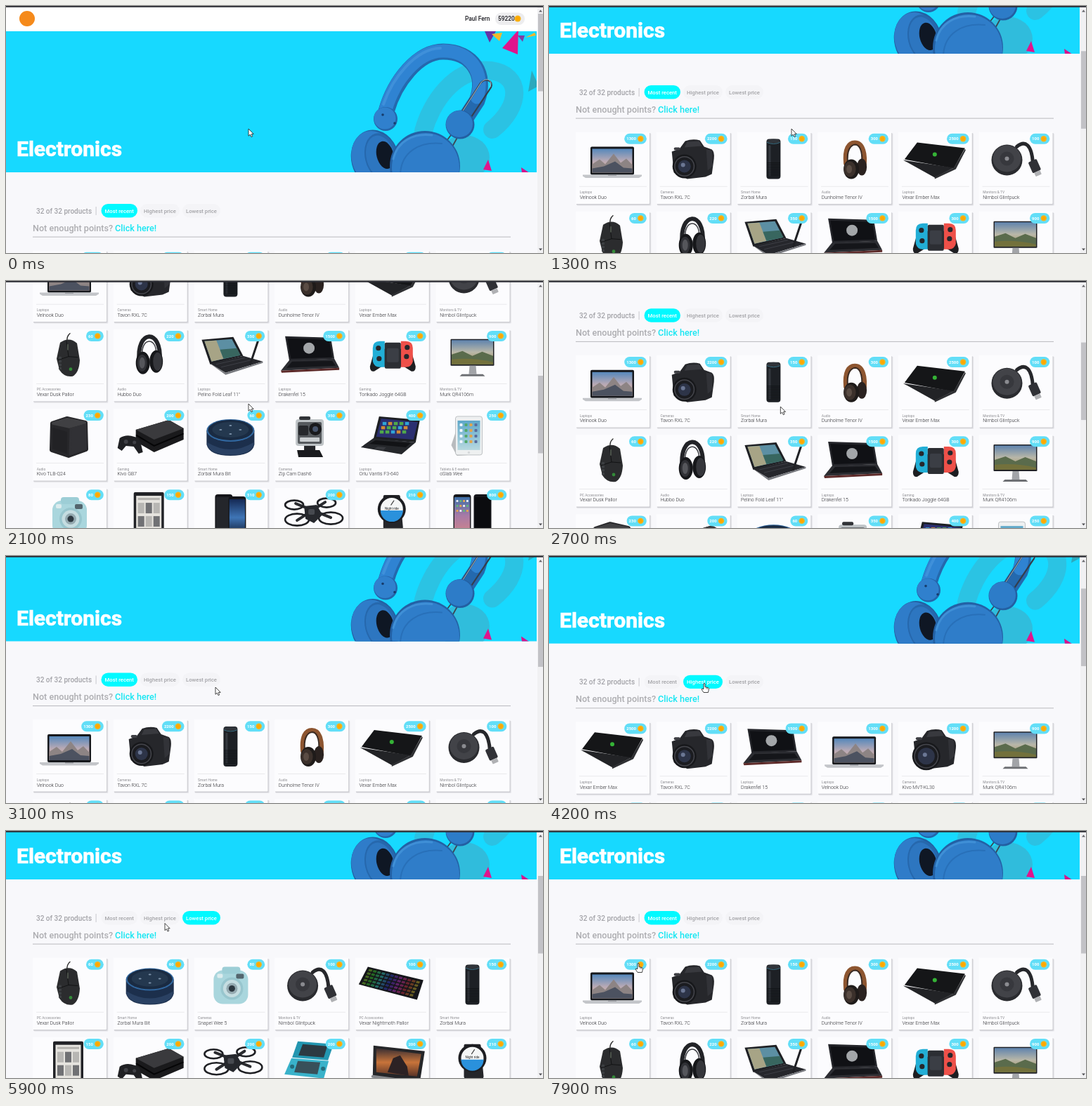
Recreate the animation shown at these times as an HTML page. Size 764 px wide and 352 px high, loop 8 s.

```html
<!DOCTYPE html>
<html lang="en">
<head>
<meta charset="utf-8">
<title>Shop catalogue</title>
<style>
html, body { margin: 0; width: 100%; height: 100%; overflow: hidden; background: #f8f8fb; }
svg { display: block; width: 764px; height: 352px; font-family: Roboto, Arial, sans-serif; }
.title { font-size: 30px; font-weight: 700; fill: #fff; stroke: #fff; stroke-width: .7px; }
.count { font-size: 10px; font-weight: 500; fill: #a3a3a8; }
.tab { font-size: 7.7px; font-weight: 500; }
.points { font-size: 12.6px; font-weight: 500; fill: #adadb1; }
.user { font-size: 8.4px; font-weight: 500; fill: #1c1c22; }
.kind { font-size: 4.9px; fill: #8c8c90; }
.name { font-size: 6.95px; font-weight: 300; fill: #26262a; }
.price { font-size: 6px; font-weight: 700; fill: #fff; }
</style>
</head>
<body>
<svg id="stage" viewBox="0 0 764 352"></svg>
<script>
const LOOP = 8000, STEP = 100;

// Drawing helpers
const rect = (x, y, w, h, fill, r = 0, more = '') =>
  `<rect x="${x}" y="${y}" width="${w}" height="${h}" rx="${r}" fill="${fill}" ${more}/>`;
const oval = (x, y, rx, fill, ry = rx, more = '') =>
  `<ellipse cx="${x}" cy="${y}" rx="${rx}" ry="${ry}" fill="${fill}" ${more}/>`;
const shape = (d, fill, more = '') => `<path d="${d}" fill="${fill}" ${more}/>`;
const soft = (d, fill, w) =>
  shape(d, fill, `stroke="${fill}" stroke-width="${w}" stroke-linejoin="round"`);
const line = (d, color, w = 1) =>
  `<path d="${d}" fill="none" stroke="${color}" stroke-width="${w}" stroke-linecap="round"/>`;
const text = (x, y, cls, s, more = '') => `<text x="${x}" y="${y}" class="${cls}" ${more}>${s}</text>`;
const group = (inner, more) => `<g ${more}>${inner}</g>`;
const shift = (x, y, inner) => group(inner, `transform="translate(${x} ${y})"`);
const repeat = (n, fn) => Array.from({ length: n }, (_, i) => fn(i)).join('');
const coin = (x, y, r) => oval(x, y, r, '#f7b21a') + oval(x, y, r * .6, '#ffa800');
const gradient = (id, stops) =>
  `<linearGradient id="${id}" x2="0" y2="1">` +
  stops.map((c, i) => `<stop offset="${i / (stops.length - 1)}" stop-color="${c}"/>`).join('') +
  '</linearGradient>';

const camera = lens =>
  shape('M-30 -14L-19 -18 -11 -29Q0 -33 10 -30L16 -21 27 -17Q31 -14 30 -4L27 18 18 22 -8 25 -27 16Z', '#26272b') +
  shape('M-8 -28L9 -29 13 -22 -12 -20Z', '#38393e') + rect(-27, -20, 9, 4, '#3e3f44', 2) +
  shape('M19 -17L27 -16 28 7 21 13Z', '#323338') +
  oval(-12, 7, lens, '#17181b') + oval(-12, 7, lens - 2.5, '#45464c') + oval(-12, 7, lens - 4, '#1b1c20') +
  oval(-12, 7, lens - 8, '#2d3448') + oval(-14, 5, 3, '#6b7794');

const handset = (x, screen) =>
  rect(x, -33, 25, 60, '#15161a', 4) + rect(x + 1.4, -29, 22.2, 52, screen, 1);

const icons = {
  silver: rect(-31, -21, 62, 40, '#16181c', 2) + rect(-28.5, -18, 57, 34, 'url(#sky)') +
    shape('M-28.5 16V4L-18 -3 -10 4 2 -11 12 2 20 -4 28.5 5V16Z', '#8d8484') +
    shape('M-28.5 16V10L-12 7 4 0 16 9 28.5 10V16Z', '#4c5260') +
    shape('M-42 19H42V21L38 23.5H-38L-42 21Z', '#c3c5c9') + rect(-6, 19, 12, 1.5, '#96989d'),
  dslr: camera(17),
  tower: rect(-10, -32, 20, 57, '#1d2025', 4) + oval(0, -29, 9.5, '#30343a', 3) +
    line('M-9 -27Q0 -23 9 -27', '#3b7186') + rect(-7, -23, 3, 44, '#353940', 1) +
    repeat(9, i => line(`M-9 ${2 + i * 2.3}H9`, '#0f1114', .8)),
  retro: line('M-12 3C-14 -18 -8 -27 1 -27C13 -27 17 -10 14 9', '#8d5530', 6) +
    line('M-9 2C-11 -16 -5 -24 2 -24C10 -23 13 -8 10 6', '#3a2a22', 2) +
    oval(11, 8, 7, '#2a2220', 12) + oval(-4, 11, 11, '#1f1b1a', 14) + oval(-6, 11, 8.5, '#3b302b', 11) +
    oval(-7, 11, 4, '#5a4c44', 6),
  blade: shape('M-25 -27L43 -19 27 10 -43 -3Z', '#151618') + shape('M-45 -2L27 9 0 23Z', '#222326') +
    shape('M27 9L43 -18 44 -16 30 11 0 25V22Z', '#2f3033') + oval(0, -10, 3, '#35b336'),
  puck: line('M2 -21C14 -31 23 -24 25 2', '#26272b', 5) + oval(-12, -2, 22, '#2a2b2f') +
    oval(-12, -4, 20, '#424348', 19) + oval(-12, -4, 10, '#37383d') + oval(-12, -4, 3, '#8a8b90') +
    group(rect(-6.5, -10, 13, 17, '#303136', 2) + rect(-4.5, 7, 9, 6, '#b0b1b4', 1), 'transform="translate(28 8) rotate(-24)"'),
  mouse: line('M-3 -24Q-4 -32 1 -36', '#2a2a2a', 1.4) +
    shape('M-13 -23Q0 -32 11 -22L15 2Q14 20 5 25Q-7 27 -14 16L-18 0Z', '#2b2c2e') +
    line('M-4 -25L-1 -3 12 -2M-16 2L-1 -3', '#121314', 1) + line('M-2 -20V-13', '#4a5149', 2) +
    repeat(4, i => rect(-15, -3 + i * 5, 4, 3.5, '#3c3f42', 1)) + oval(2, 15, 2.4, '#338a38'),
  black: line('M-15 4C-20 -42 17 -44 14 2', '#222327', 6) + line('M-11 -6C-12 -30 9 -31 9 -8', '#3c3d42', 1.5) +
    oval(9, 4, 9.5, '#16171a', 16) + oval(11, 4, 6.5, '#35363b', 13) +
    oval(-10, 6, 10, '#16171a', 16) + oval(-11, 6, 7, '#303136', 12) + oval(-11, 6, 4, '#55565b', 8),
  fold: shape('M-41 -27L4 -31 18 -4 -29 8Z', '#1e1f23') + shape('M-37 -25L2 -28 14 -5 -27 4Z', '#5c8fa3') +
    shape('M-37 -25L-20 -26 -10 0 -27 4Z', '#a7a486') + shape('M-15 -13L9 -15 14 -5 -10 0Z', '#38665f') +
    shape('M-29 7L18 -4 46 4 -7 20Z', '#26272c') + shape('M-29 7L-7 20 46 4V6L-7 23Z', '#77797e') +
    line('M-20 8L20 -1M-13 12L29 2', '#44464d', .8) + line('M40 -28L28 8', '#202125', 3),
  gamer: shape('M-37 -32L28 -30 33 0 -31 3Z', '#24252a') + shape('M-34 -29L26 -27 30 -2 -29 0Z', '#101115') +
    shape('M-31 2L33 0 40 13 -43 17Z', '#2c2d32') + shape('M-27 4L30 3 35 10 -35 13Z', '#15161a') +
    shape('M-43 17L40 13V16L-42 20Z', '#5d2a29') + oval(-3, -15, 8, '#a3a6a9'),
  console: shape('M-24 -14L-31 11Q-31 19 -25 18L-14 11H17L28 18Q34 19 34 11L27 -14Z', '#1d1e21') +
    shape('M-10 -25H-17Q-27 -25 -27 -15V4Q-25 12 -17 12H-10Z', '#22aed6') +
    shape('M13 -25H20Q30 -25 30 -15V4Q28 12 20 12H13Z', '#ee5049') +
    rect(-10, -23, 23, 37, '#2c2e33', 2) + rect(-7, -15, 17, 20, '#3b3e45', 2) +
    [[-19, -15], [-18, 0], [21, -3], [22, -16]].map(p => oval(...p, 3.6, '#26272c')).join(''),
  monitor: rect(-31, -28, 62, 38, '#202125', 1) + rect(-29.5, -26.5, 59, 34.5, 'url(#dusk)') +
    shape('M-29.5 8V-6L-14 -11 0 -4 14 -10 29.5 -4V8Z', '#5a6b4c') + shape('M-29.5 8V1Q0 -2 29.5 5V8Z', '#73713c') +
    shape('M-4 10H5L6 22H-5Z', '#a2a4a8') + shape('M-15 22H15L18 25H-18Z', '#6e7074'),
  cube: soft('M-24 -21L-3 -28 23 -22 24 16 -1 25 -25 17Z', '#27272a', 6) +
    soft('M-23 -21L-3 -27 22 -22 0 -16Z', '#404043', 4) + soft('M2 -13L23 -19V15L1 23Z', '#313135', 3) +
    shape('M-24 -15L-3 -9V22L-24 15Z', '#222225'),
  deck: shape('M-20 -12L27 -26 48 -14V2L6 20 -20 5Z', '#1a1a1c') + shape('M-20 -12L27 -26 48 -14 6 2Z', '#3a3a3d') +
    line('M-19 -4L6 11 47 -6', '#050506', 2) + shape('M-43 0Q-34 -6 -22 -2Q-14 -1 -13 7L-10 20 -16 22 -23 12 -34 11 -40 18 -46 14Z', '#202124') +
    oval(-34, 5, 3, '#3f4045') + oval(-22, 6, 2.5, '#3f4045'),
  disc: shape('M-34 -11V9Q-30 25 0 25Q31 25 34 9V-11Z', '#1c2f4c') + shape('M-33 6Q0 26 33 6V10Q28 24 0 24Q-28 24 -33 10Z', '#2a4163') +
    oval(0, -11, 34, '#31679f', 16) + oval(0, -11.5, 32, '#1a2b42', 14.5) + oval(0, -12, 26, '#24384f', 11) +
    [[-14, -12], [14, -12], [0, -18], [0, -6]].map(p => oval(...p, 2, '#7d93ab', 1)).join(''),
  action: rect(-22, -27, 40, 38, '#bfc4c7', 4) + rect(-19, -23, 34, 31, '#565a5e', 2) + rect(-18, -18, 14, 14, '#26282c', 2) +
    oval(6, -13, 9, '#191a1d') + oval(6, -13, 4, '#47546b') + rect(-17, -31, 16, 5, '#313337', 2) +
    rect(-16, -1, 28, 6, '#c9cdd0', 1) + rect(-10, 11, 16, 8, '#242529') + shape('M-20 17H12L17 27H-18Z', '#191a1d'),
  tiles: shape('M-18 -31L40 -26 34 6 -26 1Z', '#1d1f23') + shape('M-15 -28L37 -23 31 2 -22 -2Z', '#2b2f70') +
    repeat(15, i => rect(-13 + (i % 5) * 8 - (i / 5 | 0) * 2, -23 + (i / 5 | 0) * 6, 5.5, 4.5, ['#2fa4d8', '#c34d45', '#50a94a', '#8b54b5', '#d08a35'][i * 7 % 4 + i % 2])) +
    shape('M-26 0L34 6 14 23 -44 13Z', '#25272b') + shape('M-23 3L27 7 20 13 -32 8Z', '#121316') + shape('M-20 12L-8 13 -12 17 -25 15Z', '#393b40'),
  slate: shape('M-30 10L-18 -26 -10 -28 -6 24 -22 25Z', '#b8bbbe') + rect(-24, -31, 38, 55, '#eef0f1', 3, 'stroke="#b0b4b7" stroke-width=".8"') +
    rect(-21, -25, 32, 42, 'url(#ice)') + repeat(16, i => rect(-18 + (i % 4) * 7, -21 + (i / 4 | 0) * 8, 4, 4, ['#f0f5ff', '#52a86a', '#e2a54b', '#596d9c'][i * 5 % 4], 1)) +
    oval(-5, 20.5, 1.7, '#d5d8da'),
  instant: rect(-24, -24, 49, 48, '#a9d6dd', 13) + rect(-12, -29, 26, 10, '#9dced6', 4) + rect(-19, -19, 8, 6, '#dcecee', 2) +
    rect(8, -19, 11, 7, '#54666e', 2) + oval(2, 2, 16, '#98c6ce') + oval(2, 2, 12.5, '#c5dde1') + oval(2, 2, 8, '#94a9b0') +
    oval(2, 2, 4.5, '#2d3840'),
  reader: rect(-23, -36, 43, 64, '#212226', 2) + rect(-19.5, -31, 36, 52, '#e6e4df') + rect(-17, -28, 31, 3, '#b4b2ae') +
    repeat(6, i => rect(-17 + (i % 3) * 11, -21 + (i / 3 | 0) * 19, 9, 15, i % 2 ? '#707174' : '#b7b6b3')),
  curved: handset(-22, '#24262b') + shift(0, 3, handset(-3, 'url(#night)')),
  drone: line('M-22 -20L28 0M-20 4L20 -22', '#2b2c30', 4) +
    [[-24, -18, 13], [22, -21, 13], [-20, 3, 17], [28, 1, 17]].map(p => oval(p[0], p[1], p[2], 'none', p[2] / 2, 'stroke="#1f2024" stroke-width="2.6"')).join('') +
    shape('M-10 -16L8 -18 16 -4 4 8 -8 2Z', '#26282d') + rect(-4, -12, 9, 8, '#474a50', 2),
  watch: soft('M-10 -30H10L14 14 10 30H-4L-10 14Z', '#25262a', 4) + oval(0, -12, 20, '#1d1e22') + oval(0, -12, 16, '#f4f6f6') +
    shape('M-16 -10H16A16 16 0 0 1 -16 -10Z', '#2a91dc') + line('M3 -24L-1 -18', '#444', 1.2) +
    text(0, -11.5, 'kind', 'Night ride', 'text-anchor="middle" style="font-size:4.6px;fill:#222"'),
  duo: handset(2, '#0b0c0f') + handset(-27, 'url(#swirl)') +
    repeat(12, i => rect(-23 + (i % 4) * 4.8, -25 + (i / 4 | 0) * 7, 3, 3, ['#e8eef5', '#62b878', '#e4a552'][i % 3], .8)),
  keys: shape('M-34 -29L45 -10 36 18 -47 -4Z', '#15161a') +
    group(repeat(60, i => rect((i % 12) * 6.4, (i / 12 | 0) * 4.6, 5, 3, `hsl(${(i % 12) * 29 + 90},50%,27%)`, .6)), 'transform="matrix(.96 .24 -.5 1 -32 -26)"'),
  zoom: camera(20),
  pocket: shape('M-19 -36L32 -32 24 -9 -27 -13Z', '#2396b0') + shape('M-12 -32L23 -29 18 -13 -18 -16Z', '#2c3a42') +
    shape('M-28 -12L25 -8 18 17 -38 11Z', '#39b2ca') + shape('M-19 -8L13 -6 9 11 -24 8Z', '#38505a') + oval(-27, 0, 3, '#246c7c') + oval(17, 3, 3, '#246c7c'),
  stand: shape('M-26 -30L47 -22 40 22 -27 14Z', '#252629') + shape('M-22 -26L42 -18 36 14 -22 8Z', 'url(#ember)') +
    shape('M-6 8L2 -12 12 -16 22 0 24 13Z', '#2c2224') + line('M-27 14L39 23', '#85878b', 4)
};

// icon | category | name | price
const goods = `silver|Laptops|Velnook Duo|1300
dslr|Cameras|Tavon RXL 7C|2200
tower|Smart Home|Zorbal Mura|150
retro|Audio|Dunholme Tenor IV|300
blade|Laptops|Vexar Ember Max|2500
puck|Monitors &amp; TV|Nimbol Glintpuck|100
mouse|PC Accessories|Vexar Dusk Pallor|60
black|Audio|Hubbo Duo|220
fold|Laptops|Pelino Fold Leaf 11"|350
gamer|Laptops|Drakenfel 15|1500
console|Gaming|Torikado Joggle 64GB|300
monitor|Monitors &amp; TV|Murk QR4106m|900
cube|Audio|Kivo TLB-Q24|230
deck|Gaming|Kivo GB7|200
disc|Smart Home|Zorbal Mura Bit|60
action|Cameras|Zip Cam Dash6|350
tiles|Laptops|Orlu Vantis F3-640|400
slate|Tablets &amp; E-readers|oSlab Wee|250
instant|Cameras|Snapel Wee 5|80
reader|Tablets &amp; E-readers|Inkolo Page|150
curved|Phones|Starvo N6|510
drone|Drones|Whirlo Four|200
watch|Smart Home|Tempor Loop|210
duo|Phones|oSlab Call|800
keys|PC Accessories|Vexar Nightmoth Pallor|100
zoom|Cameras|Kivo MVT-KL30|1200
pocket|Gaming|Torikado Pair|200
stand|Tablets &amp; E-readers|Pelino Prop|200`.split('\n').map(row => {
  const [icon, kind, name, price] = row.split('|');
  return { icon, kind, name, price };
});

function card(p, i) {
  const x = 38 + (i % 6) * 114.7, y = 348.5 + Math.floor(i / 6) * 113.2;
  const w = 18 + p.price.length * 3.4, left = 100.8 - w;
  return shift(x, y,
    rect(1.5, 2, 105.8, 103, '#e4e4e8', 1) + rect(1, 1.5, 105.2, 102.4, '#cfcfd4', 1) + rect(0, 0, 105, 102.6, '#fcfcfe', 1) +
    shift(52, 42, icons[p.icon]) +
    rect(left, 2.2, w, 15, '#62def7', 7.5) + text(left + 3, 11.9, 'price', p.price) + coin(92.3, 9.7, 4.2) +
    rect(5, 77.3, 96, .7, '#e2e2e5') + text(5.7, 87.8, 'kind', p.kind) + text(5.7, 95.5, 'name', p.name));
}
const byPrice = sign => [...goods].sort((a, b) => sign * (a.price - b.price));
const lists = [goods, byPrice(-1), byPrice(1)];
const tabs = [['Most recent', 135.5, 51.5], ['Highest price', 191, 56], ['Lowest price', 251, 54]];

const tri = (points, fill) => `<polygon points="${points}" fill="${fill}"/>`;
const hero = rect(0, 36, 755, 201, '#17d9ff') + group(
  group(line('M594 178C604 140 638 86 690 92C734 98 734 142 692 176', '#2fbfdf', 26) + oval(652, 216, 36, '#35b8d6', 32), 'opacity=".85"') +
  tri('681,36 697,36 688,52', '#6434a6') + tri('691,40 706,38 702,50', '#f3b72c') + tri('729,34 706,60 728,69', '#e0148c') +
  tri('728,42 738,42 735,51', '#7d3fa6') + tri('739,45 752,38 754,42', '#f3b72c') + tri('748,92 743,122 758,114', '#2ca9bd') +
  tri('686,219 679,233 691,235', '#e0148c') + tri('733,230 745,238 734,238', '#d5158c') +
  line('M541 150C553 108 586 65 622 65C664 65 684 98 670 135L655 158', '#2469ae', 23) +
  line('M540 148C552 106 585 64 621 64C660 63 682 96 670 130', '#2f83d2', 19) +
  line('M537 140C550 102 583 61 618 60', '#3f90da', 4) +
  line('M648 152L675 110C682 102 694 106 690 116L662 158', '#343e4c', 2.2) +
  line('M649 151L676 109C683 101 693 105 689 115', '#b5cbd8', .9) +
  oval(540, 161, 17, '#2466ab') + oval(539, 160, 15.5, '#3080cd') + oval(536, 155, 1.8, '#173c6c') + oval(553, 167, 1.8, '#173c6c') +
  line('M636 180L624 196M644 184L634 202', '#3d4652', 1.8) +
  oval(646, 169, 20.5, '#235fa2') + oval(645, 168, 19, '#2d7cc8') +
  group(oval(525, 218, 34, '#2361a3', 42) + oval(523, 216, 31, '#2f7cc9', 39) + oval(534, 217, 23, '#2668ad', 34) +
    oval(533, 217, 20, '#2d76c0', 31) + oval(540, 216, 12, '#0f1724', 20), 'transform="rotate(-14 525 217)"') +
  oval(596, 228, 50, '#2361a5', 50) + oval(597, 230, 48, '#2f7dc9', 49) +
  line('M551 218C557 192 580 181 606 184', '#3f8fd6', 3) + line('M561 240C562 208 588 193 620 196', '#2870b9', 2),
  'clip-path="url(#heroBox)"');

const page = rect(0, 0, 756, 36, '#fff') + oval(30, 18, 11, '#f58a1b') + text(653, 21, 'user', 'Paul Fern') +
  rect(696, 9.5, 42, 17.5, '#ededef', 8.75) + text(700, 21, 'user', '59220') + coin(728, 18, 4.6) +
  hero + text(15, 214.3, 'title', 'Electronics') +
  text(43, 295.6, 'count', '32 of 32 products') + rect(127.6, 286, 1, 12, '#c9c9cd') +
  tabs.map(([label, x, w]) => group(rect(x, 282, w, 19.4, '', 9.7) +
    text(x + w / 2, 294.7, 'tab', label, 'text-anchor="middle"'), 'class="pill"')).join('') +
  text(38, 320.6, 'points', 'Not enought points? <tspan x="155" fill="#16e6f2">Click here!</tspan>') +
  rect(38, 328.6, 680, 1, '#b9b9bd') +
  lists.map(l => group(l.slice(0, 24).map(card).join(''), 'class="list"')).join('');

const stage = document.getElementById('stage');
stage.innerHTML = '<defs><clipPath id="heroBox"><rect y="36" width="755" height="201"/></clipPath>' +
  gradient('sky', ['#5688bb', '#b7a9b5', '#e5b197']) + gradient('dusk', ['#5f83ad', '#b9b7a8', '#9c8a57']) +
  gradient('ice', ['#5da7c9', '#b8d9e0']) + gradient('night', ['#152a55', '#3f75b6', '#0e1930']) +
  gradient('swirl', ['#3d6fa8', '#a77aa6', '#d1848a']) + gradient('ember', ['#3a2f33', '#c8743a', '#5a3428']) + '</defs>' +
  rect(0, 0, 764, 352, '#f8f8fb') + group(page, 'id="page"') +
  rect(756, 0, 8, 352, '#f1f1f3') + rect(757, 11, 7, 110.5, '#c2c2c6', 0, 'id="thumb"') +
  shape('M758 8.5L760.5 5.5 763 8.5Z', '#606064') + shape('M758 345.5L760.5 348.5 763 345.5Z', '#505054') +
  rect(0, 0, 764, 1.8, '#2c2d34') +
  group(shape('M0 0V10.2L2.4 8.1 4 11.6 5.7 10.8 4.2 7.4H7.2Z', '#fff', 'stroke="#1a1a1a" stroke-width=".8"'), 'id="arrow"') +
  group(shape('M-1 0Q0 -1.2 1 0V4.6L5.4 5.6Q6.8 6 6.4 8L5.4 12.5H-1L-4 8Q-4.4 6.4 -1 7.6Z', '#fff', 'stroke="#1a1a1a" stroke-width=".8"') +
    line('M2.8 5.2V7.4M4.5 5.6V7.6', '#1a1a1a', .5), 'id="hand"');

const [pageEl, thumb, arrow, hand] = ['page', 'thumb', 'arrow', 'hand'].map(id => document.getElementById(id));
const pills = stage.querySelectorAll('.pill'), listEls = stage.querySelectorAll('.list');

// Rows of time followed by values, linear in between
const scrollKeys = [[0, 0], [500, 0], [1300, 169], [2100, 393], [2300, 393], [3000, 130], [3100, 115.5],
  [3200, 112.3], [4400, 112.3], [5000, 168], [LOOP, 168]];
const mouseKeys = [[0, 345, 175], [2500, 345, 175], [3100, 298, 187], [3600, 221, 182], [4400, 221, 182], [5000, 278, 125],
  [5500, 278, 125], [5900, 226, 131.5], [6300, 161, 126], [7000, 161, 126], [7500, 127, 189], [LOOP, 127, 189]];
const clicks = [[0, 0], [3800, 1], [5300, 2], [6500, 0]];

function at(keys, t) {
  const i = keys.findIndex(k => k[0] > t), a = keys[i - 1], b = keys[i];
  const u = (t - a[0]) / (b[0] - a[0]);
  return a.slice(1).map((v, n) => v + (b[n + 1] - v) * u);
}

function isLink(x, y) {
  const onTab = Math.abs(y - 292) < 7 && tabs.some(([, left, w]) => x > left && x < left + w);
  return onTab || (x > 107 && x < 139 && y > 350 && y < 366);
}

function draw(t) {
  const [scroll] = at(scrollKeys, t), [x, y] = at(mouseKeys, t);
  const active = clicks.filter(c => c[0] <= t).pop()[1];
  const link = isLink(x, y + scroll);
  pageEl.setAttribute('transform', `translate(0 ${-scroll})`);
  thumb.setAttribute('y', 11 + scroll * .3155);
  pills.forEach((p, i) => {
    p.children[0].setAttribute('fill', i === active ? '#02f9ff' : '#f4f4f7');
    p.children[1].setAttribute('fill', i === active ? '#fff' : '#a3a3a7');
  });
  listEls.forEach((l, i) => l.setAttribute('display', i === active ? 'inline' : 'none'));
  [arrow, hand].forEach((el, i) => {
    el.setAttribute('transform', `translate(${x} ${y})`);
    el.setAttribute('display', link === !!i ? 'inline' : 'none');
  });
}

const start = performance.now();
function tick() {
  const t = (performance.now() - start) % LOOP;
  draw(Math.floor(t / STEP) * STEP);
  requestAnimationFrame(tick);
}
tick();
</script>
</body>
</html>
```
